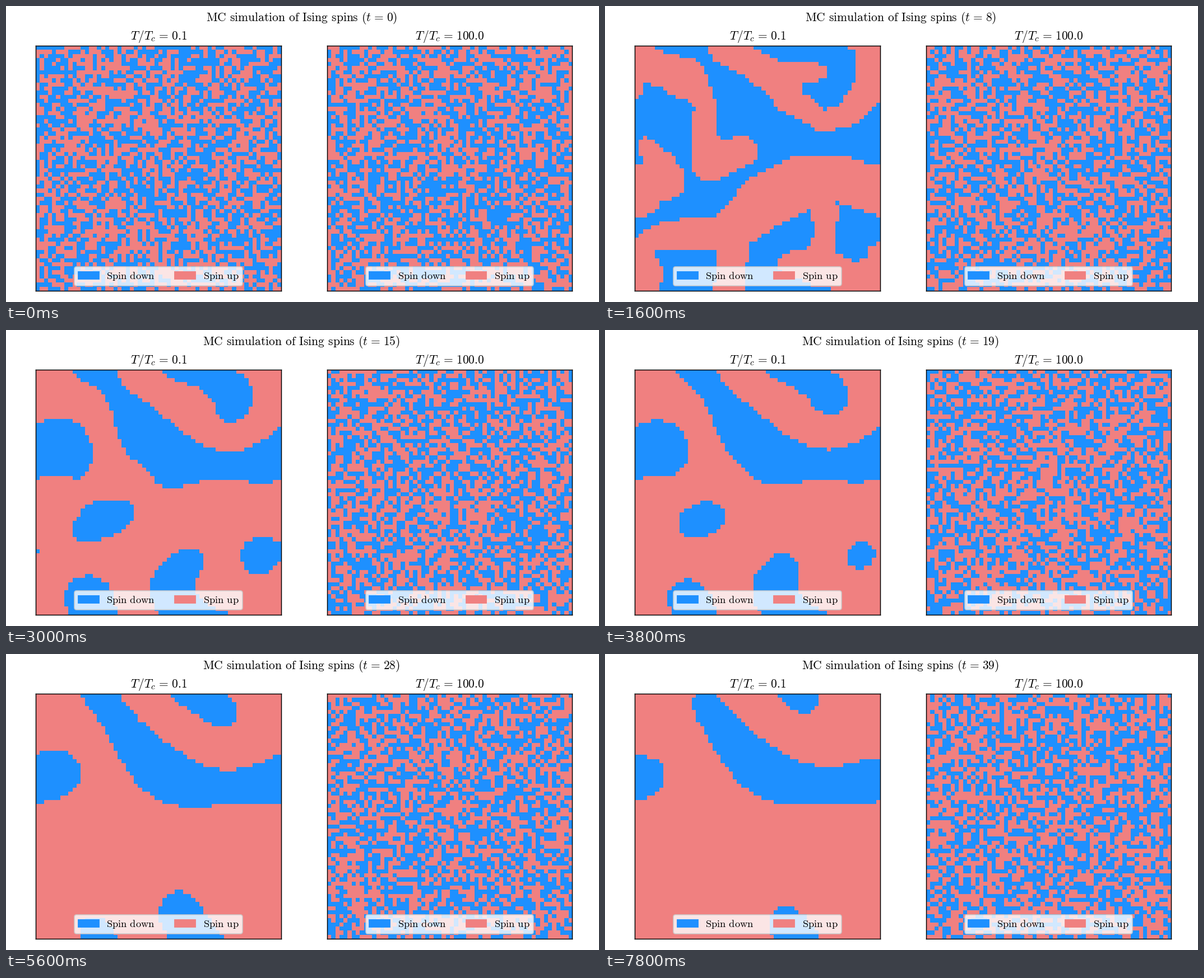
These frames come from a looping animation (1058x529 px, 8 s). A matplotlib script:

```python
import itertools

import numpy as np
import matplotlib.pyplot as plt
from matplotlib.animation import FuncAnimation
from matplotlib.colors import ListedColormap
from matplotlib.patches import Patch

W, H, DPI = 1058, 529, 132.25
N, FRAMES, STEP_MS = 60, 40, 200
FORMED = 8       # sweep at which the cold domains are fully formed
REACH = 1.67     # blur per sweep, sets how fast curved walls shrink
UP, DOWN = "lightcoral", "dodgerblue"

plt.rcParams.update({"mathtext.fontset": "cm", "font.family": "Liberation Serif"})

# Spin-up domains as strokes of (x, y, radius) in cells, on a torus.
BODY = [(-2, 5, 4), (6, 5.5, 4.2), (12.5, 8, 5)]
HOOK = [(14.5, 9, 3.5), (17.5, 15, 2.7), (16.8, 21, 3.2), (18.5, 28.5, 4.5),
        (26.5, 25.7, 3.6)]
ARM = [(22, 1, 3.6), (29, 4.5, 3.7), (36, 9, 4.6), (37.7, 13, 3.6),
       (46, 18.5, 2.5), (52, 17, 2.9), (58, 10, 4.2), (59, 2, 5)]
FINGER = [(39, 7, 3), (45, 6.5, 2)]
BLOB = [(2.5, 24, 1.8), (6, 29, 3.8), (8, 33, 4.5), (0, 35, 5.5)]
BAND = [(-1, 51, 2.2), (6, 46.5, 3), (13, 46, 3.8), (23, 46, 4.8),
        (32, 38, 6.8), (41, 33.5, 6.8), (50, 32.5, 5.5), (61, 36, 6)]
LEG = [(24, 48, 4), (23.5, 58, 3.5), (22, 61, 3)]
FOOT = [(46.5, 40, 3.3), (46.5, 47, 2.6), (45, 54, 4.8)]
TOE = [(38, 53.3, 2.8), (45, 54, 4.8), (54, 57, 3.8), (61, 56, 6)]
STROKES = BODY, HOOK, ARM, FINGER, BLOB, BAND, LEG, FOOT, TOE

cx, cy = np.meshgrid(np.arange(N) + 0.5, np.arange(N) + 0.5)
rng = np.random.default_rng(7)


def capsule(a, b):
    """Signed distance to a tapered segment, wrapped around the edges."""
    (ax, ay, ar), (bx, by, br) = a, b
    dx, dy = bx - ax, by - ay
    best = np.full((N, N), np.inf)
    for sx, sy in itertools.product((-N, 0, N), repeat=2):
        px, py = cx + sx - ax, cy + sy - ay
        h = np.clip((px * dx + py * dy) / (dx**2 + dy**2), 0, 1)
        gap = np.hypot(px - h * dx, py - h * dy) - (ar + h * (br - ar))
        best = np.minimum(best, gap)
    return best


def blur(field, sigma):
    """Periodic Gaussian blur."""
    k = 2 * np.pi * np.fft.fftfreq(N)
    kernel = np.exp(-0.5 * sigma**2 * (k[:, None] ** 2 + k**2))
    return np.fft.ifft2(np.fft.fft2(field) * kernel).real


def cold_states():
    """Low temperature: noise coarsens, then walls move by their curvature."""
    noise = rng.choice([-1.0, 1.0], (N, N))
    wall = np.min([capsule(a, b) for s in STROKES for a, b in zip(s, s[1:])], axis=0)
    wall = np.clip(wall, -5, 5)
    states = [noise > 0]
    for t in range(1, FORMED):
        w = t / FORMED
        grain = blur(noise, 0.3 + 0.7 * np.sqrt(t))
        states.append(2 * (1 - w) * grain / grain.std() + w * wall > 0)
    field = np.tanh(wall)
    for _ in range(FORMED, FRAMES):
        states.append(field > 0)
        field = np.tanh(3 * blur(field, REACH))
    return states


def hot_states():
    """High temperature: every attempted flip of a sweep is accepted."""
    flip = (1 - np.exp(-2)) / 2
    states = [rng.random((N, N)) < 0.5]
    for _ in range(FRAMES - 1):
        states.append(states[-1] ^ (rng.random((N, N)) < flip))
    return states


panels = [cold_states(), hot_states()]

SP = r"\hspace{0.38}"
EQ = r"\hspace{0.116}=\hspace{0.116}"


def roman(words):
    return r"\mathrm{" + words.replace(" ", SP) + "}"


def heading(t):
    return f"${roman('MC simulation of Ising spins ')}(t{EQ}{roman(str(t))})$"


fig = plt.figure(figsize=(W / DPI, H / DPI), dpi=DPI, facecolor="white")
title = fig.text(527.2 / W, 1 - 27 / H, heading(0), fontsize=11.7,
                 ha="center", va="baseline")
cmap = ListedColormap([UP, DOWN])
side = 437.8
images = []
for x, ratio, states in zip((53.3, 572.6), ("0.1", "100.0"), panels):
    ax = fig.add_axes((x / W, 1 - 509.1 / H, side / W, side / H))
    images.append(ax.imshow(states[0], cmap=cmap, vmin=0, vmax=1,
                            aspect="auto", interpolation="nearest"))
    ax.set_xticks([])
    ax.set_yticks([])
    ax.set_title(rf"$T\hspace{{0.06}}/T_c{EQ}{roman(ratio)}$", fontsize=11.7)
    ax.legend(handles=[Patch(color=DOWN, label=f"${roman('Spin down')}$"),
                       Patch(color=UP, label=f"${roman('Spin up')}$")],
              loc="lower center", ncols=2, fontsize=10, borderpad=0.37,
              handletextpad=0.745, columnspacing=1.93)


def update(t):
    for image, states in zip(images, panels):
        image.set_data(states[t])
    title.set_text(heading(t))
    return [*images, title]


anim = FuncAnimation(fig, update, frames=FRAMES, interval=STEP_MS,
                     repeat=True, repeat_delay=0, blit=False)
plt.show()
```
